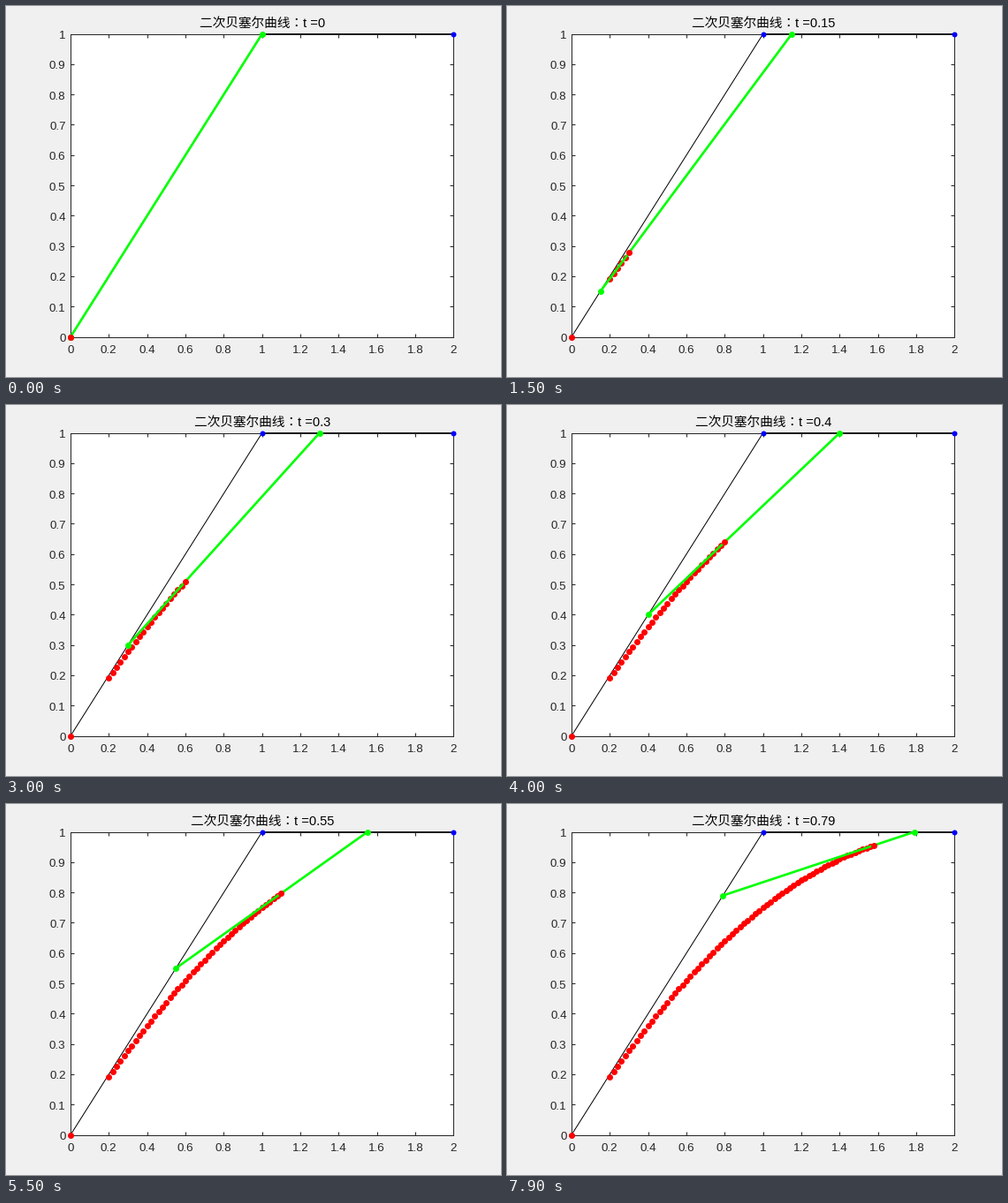
Write a matplotlib script that moves like this. It is 560 px wide and 420 px high and loops after 8000 ms.

```python
import numpy as np
import matplotlib.pyplot as plt
from matplotlib.animation import FuncAnimation

DPI = 80
W, H = 560, 420
FRAMES, INTERVAL = 80, 100
PX = 72 / DPI  # points per pixel
INK = (0.15, 0.15, 0.15)
GREEN, RED, BLUE = (0, 1, 0), (1, 0, 0), (0, 0, 1)
SANS = ["Liberation Sans", "Noto Sans CJK JP"]

P0, P1, P2 = np.array([[0, 0], [1, 1], [2, 1]], dtype=float)
LEFT, BOTTOM, WIDTH, HEIGHT = 73, 45.4, 433.4, 343


def lerp(a, b, t):
    return a + (b - a) * t


def bezier(t):
    t = np.asarray(t, dtype=float)[:, None]
    return lerp(lerp(P0, P1, t), lerp(P1, P2, t), t)


fig = plt.figure(figsize=(W / DPI, H / DPI), dpi=DPI, facecolor="#f0f0f0")
ax = fig.add_axes([LEFT / W, BOTTOM / H, WIDTH / W, HEIGHT / H])
ax.set_ylim(0, 1)
ax.set_yticks(np.linspace(0, 1, 11))
ax.tick_params(direction="in", length=4 * PX, width=PX, color=INK,
               top=True, right=True, labelbottom=False, labelleft=False)
for spine in ax.spines.values():
    spine.set(linewidth=PX, edgecolor=INK)


def label(x, y, text="", size=40 / 3, color=INK, ha="center"):
    """Text at pixel x, with its baseline y pixels below the top edge."""
    return fig.text(x, H - y, text, transform=None, fontsize=size * PX,
                    family=SANS, color=color, ha=ha, va="baseline")


def stroke(color, z, width=0, dot=0):
    return ax.plot([], [], color=color, lw=width * PX,
                   ls="-" if width else "none",
                   marker="o" if dot else "", ms=dot * PX, mew=0,
                   zorder=z, clip_on=False)[0]


for v in np.linspace(0, 1, 11):
    label(67.6, H - BOTTOM - v * HEIGHT + 5.4, f"{v:g}", ha="right")
x_labels = [label(0, 393) for _ in range(11)]
title = label(290.3, 24, size=44 / 3, color="black")

hull = stroke("black", 3, width=1)
ends = stroke(BLUE, 4, dot=6)
trail = stroke(RED, 5, dot=7)
tangent = stroke(GREEN, 6, width=8 / 3, dot=7)
tip = stroke(RED, 7, dot=7)


def set_x_range(top):
    ticks = np.arange(round(top / 0.2) + 1) * 0.2
    ax.set_xlim(0, top)
    ax.set_xticks(ticks)
    for i, text in enumerate(x_labels):
        shown = i < len(ticks)
        text.set_visible(shown)
        if shown:
            text.set_x(LEFT + ticks[i] / top * WIDTH - 0.2)
            text.set_text(f"{ticks[i]:g}")


def draw(k):
    t = k / 100
    # The early steps show only the moving segment, on a tighter x axis.
    bare = 0 < k < 10
    set_x_range(1.2 if bare else 2)
    for part in (hull, ends, trail):
        part.set_visible(not bare)

    polygon = np.array([P0, P1, P2])
    hull.set_data(*polygon.T)
    ends.set_data(*polygon.T)
    past = np.concatenate(([0], np.arange(10, k))) / 100
    trail.set_data(*bezier(past).T)
    tangent.set_data(*np.array([lerp(P0, P1, t), lerp(P1, P2, t)]).T)
    tip.set_data(*bezier([t]).T)
    title.set_text(f"二次贝塞尔曲线：t ={t:g}")
    return hull, ends, trail, tangent, tip, title


anim = FuncAnimation(fig, draw, frames=FRAMES, interval=INTERVAL,
                     repeat=True, repeat_delay=0, blit=False)
plt.show()
```
